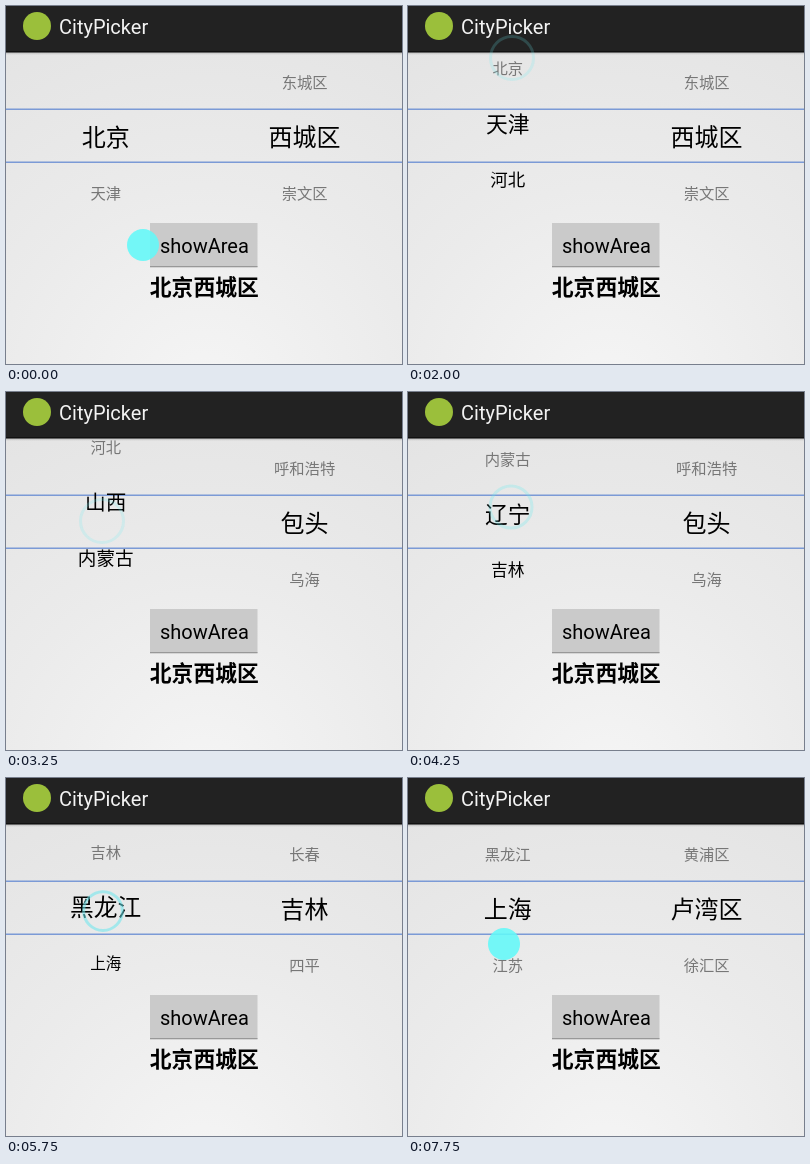
An HTML page with a canvas for the animation above (8000 ms loop, 396x358 px).

```html
<!DOCTYPE html>
<html lang="zh-CN">
<head>
<meta charset="utf-8">
<title>CityPicker</title>
<style>
  html, body { margin: 0; width: 100%; height: 100%; overflow: hidden; background: #e8e8e8; }
  canvas { display: block; width: 396px; height: 358px; }
</style>
</head>
<body>
<canvas id="stage"></canvas>
<script>
const W = 396, H = 358, LOOP = 8000, STEP = 250;
const ROW = 55.5, MIDDLE = 132;
const SMALL = 15.3, LARGE = 24;
const DRAG = 500, SETTLE = 500, ROWS_PER_SWIPE = 2;
const CJK = '"Noto Sans CJK SC", "Noto Sans CJK JP", "Noto Sans CJK", sans-serif';
const LATIN = 'Roboto, sans-serif';

const canvas = document.getElementById('stage');
const ctx = canvas.getContext('2d');
const ratio = window.devicePixelRatio || 1;
canvas.width = W * ratio;
canvas.height = H * ratio;

const provinces = ['北京', '天津', '河北', '山西', '内蒙古', '辽宁', '吉林', '黑龙江', '上海', '江苏'];
const areas = [
  ['东城区', '西城区', '崇文区'],
  ['石家庄', '唐山', '秦皇岛'],
  ['呼和浩特', '包头', '乌海'],
  ['长春', '吉林', '四平'],
  ['黄浦区', '卢湾区', '徐汇区']
];

// Each drag pulls the wheel by some rows and lets go at (x, y).
const swipes = [
  { release: 2000, pull: 1.25, x: 104, y: 52 },
  { release: 3250, pull: 1.38, x: 96, y: 129 },
  { release: 4250, pull: 1.16, x: 103, y: 115 },
  { release: 5750, pull: 1.03, x: 97, y: 133 }
];

// The pointer meets the wheel, follows it 1:1, overshoots and returns.
const pointerPath = [
  { t: 0, x: 137, y: 239 },
  { t: 250, x: 144, y: 241 },
  ...swipes.flatMap(({ release, pull, x, y }) => [
    { t: release - DRAG, x, y: y + pull * ROW },
    { t: release, x, y },
    { t: release + STEP, x, y: y - 8 }
  ]),
  { t: 6500, x: 103, y: 217 },
  { t: 6750, x: 103, y: 217 },
  { t: 7750, x: 96, y: 166 }
];

const clamp = v => Math.min(1, Math.max(0, v));
const mix = (a, b, k) => a + (b - a) * k;

function swipeProgress(swipe, t) {
  const since = t - swipe.release;
  return since < 0
    ? swipe.pull * clamp(1 + since / DRAG)
    : mix(swipe.pull, ROWS_PER_SWIPE, clamp(since / SETTLE));
}

function pointerAt(t) {
  const i = pointerPath.findIndex(p => p.t > t);
  if (i < 0) return pointerPath[pointerPath.length - 1];
  const a = pointerPath[i - 1], b = pointerPath[i];
  const k = (t - a.t) / (b.t - a.t);
  const eased = b.y > a.y ? 1 - (1 - k) ** 1.5 : k;
  return { x: mix(a.x, b.x, eased), y: mix(a.y, b.y, eased) };
}

function rect(x, y, w, h, fill) {
  ctx.fillStyle = fill;
  ctx.fillRect(x, y, w, h);
}

function disc(x, y, r, fill) {
  ctx.beginPath();
  ctx.arc(x, y, r, 0, Math.PI * 2);
  ctx.fillStyle = fill;
  ctx.fill();
}

function text(str, x, y, font, fill, align = 'center') {
  ctx.font = font;
  ctx.fillStyle = fill;
  ctx.textAlign = align;
  ctx.fillText(str, x, y);
}

function drawBackground() {
  const glow = ctx.createRadialGradient(198, 390, 20, 198, 390, 400);
  glow.addColorStop(0, '#f4f4f4');
  glow.addColorStop(0.5, '#ebebeb');
  glow.addColorStop(1, '#e4e4e4');
  rect(0, 0, W, H, glow);
}

function drawHeader() {
  rect(0, 0, W, 46, '#222222');
  rect(0, 45, W, 1.5, '#111111');
  const shadow = ctx.createLinearGradient(0, 46, 0, 49);
  shadow.addColorStop(0, 'rgba(0,0,0,.2)');
  shadow.addColorStop(1, 'rgba(0,0,0,0)');
  rect(0, 46, W, 3, shadow);
  disc(31, 20, 14, '#9bbf3b');
  text('CityPicker', 53, 28, '20px ' + LATIN, '#f3f3f3', 'left');
}

function drawWheel(names, position, x) {
  ctx.save();
  ctx.beginPath();
  ctx.rect(0, 47, W, 166);
  ctx.clip();
  names.forEach((name, i) => {
    const offset = (i - position) * ROW;
    if (Math.abs(offset) > ROW * 2) return;
    const near = clamp(1 - Math.abs(offset) / ROW);
    const size = mix(SMALL, LARGE, near);
    const color = near > 0.001 ? '#000' : '#777';
    text(name, x, MIDDLE + offset + size * 0.34, size + 'px ' + CJK, color);
  });
  ctx.restore();
}

function drawButton() {
  rect(144, 217, 107.5, 44, '#cacaca');
  rect(144, 260, 107.5, 1.3, '#989898');
  text('showArea', 198.4, 247, '20px ' + LATIN, '#000');
  text('北京西城区', 198.3, 289, 'bold 21.8px ' + CJK, '#000');
}

function drawPointer(t) {
  const { x, y } = pointerAt(t);
  const swipe = swipes.find(s => Math.abs(t - s.release) <= STEP);
  if (!swipe) return disc(x, y, 16, 'rgba(98,248,248,.88)');
  // The ring widens and fades as the swipe goes on.
  const age = clamp((swipeProgress(swipe, t) - 1) * 5);
  ctx.beginPath();
  ctx.arc(x, y, mix(19, 21.5, age), 0, Math.PI * 2);
  ctx.lineWidth = 3;
  ctx.strokeStyle = `rgba(105,232,238,${mix(0.6, 0.2, age)})`;
  ctx.stroke();
}

function draw(t) {
  const progress = swipes.map(swipe => swipeProgress(swipe, t));
  const row = progress.reduce((sum, p) => sum + p, 0);
  const selected = progress.filter(p => p > 1.3).length;
  ctx.setTransform(ratio, 0, 0, ratio, 0, 0);
  drawBackground();
  drawHeader();
  for (const y of [102.5, 155.5]) rect(0, y, W, 1.5, '#7b9ad6');
  drawWheel(provinces, row, 99.7);
  drawWheel(areas[selected], 1, 298.6);
  drawButton();
  drawPointer(t);
}

const start = performance.now();
function tick() {
  const t = (performance.now() - start) % LOOP;
  draw(Math.floor(t / STEP) * STEP);
  requestAnimationFrame(tick);
}
tick();
</script>
</body>
</html>
```
